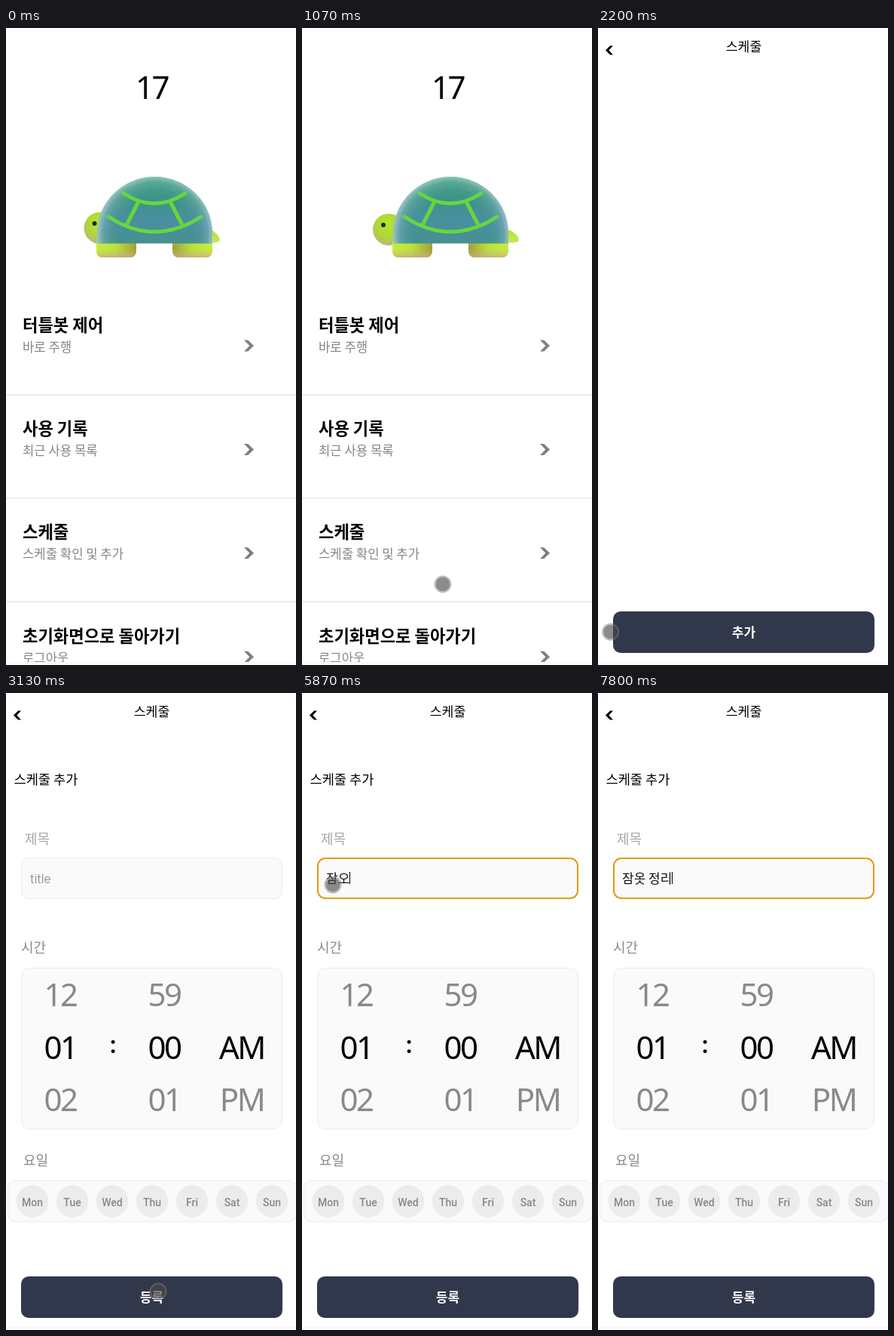
An HTML page with a canvas for the animation above (8 s loop, 385 px wide and 844 px high).

```html
<!DOCTYPE html>
<html lang="ko">
<head>
<meta charset="utf-8">
<title>스케줄</title>
<style>
  html, body { margin: 0; width: 100%; height: 100%; overflow: hidden; background: #fff; }
  canvas { display: block; width: 385px; height: 844px; }
</style>
</head>
<body>
<canvas id="stage" width="385" height="844"></canvas>
<script>
const ctx = document.getElementById('stage').getContext('2d');
const LOOP = 8000;
const HANGUL = '"Noto Sans CJK KR", "Noto Sans CJK JP", "Noto Sans CJK", sans-serif';
const LATIN = 'Roboto, sans-serif';
const NARROW = '"Noto Sans", sans-serif';
const GRAY = '#88898b';

const TIMES = { list: 1730, form: 3130, focus: 4400 };

// [time, x, y]
const POINTER = [
  [860, 49, 838], [930, 92, 800], [1070, 187, 737], [1270, 172, 719], [1600, 156, 706],
  [2030, 156, 706], [2130, 60, 760], [2200, 14, 800], [2270, 200, 812], [2330, 207, 793],
  [2410, 207, 793], [2470, 202, 793], [3420, 202, 793], [4000, 126, 262],
  [4610, 126, 262], [4730, 41, 254], [7230, 41, 254], [7530, 32, 254],
  [7670, 32, 254], [7730, 17, 388], [7790, 0, 430]
];

const TYPING = [
  [5200, 'ㅈ'], [5330, '자'], [5470, '잠'], [5730, '잠ㅇ'], [5870, '잠오'], [6000, '잠옷'],
  [6130, '잠옷 '], [6270, '잠옷 ㅈ'], [6330, '잠옷 저'], [6470, '잠옷 정'],
  [6600, '잠옷 정ㄹ'], [6730, '잠옷 정리']
];

const MENU = [
  ['터틀봇 제어', '바로 주행'],
  ['사용 기록', '최근 사용 목록'],
  ['스케줄', '스케줄 확인 및 추가'],
  ['초기화면으로 돌아가기', '로그아웃']
];

const mix = (a, b, p) => a + (b - a) * p;

function ease(t, from, to) {
  const p = Math.min(1, Math.max(0, (t - from) / (to - from)));
  return p * p * (3 - 2 * p);
}

function text(str, x, y, font, color = '#000', align = 'left', spacing = 0) {
  ctx.font = font;
  ctx.letterSpacing = spacing + 'px';
  ctx.textAlign = align;
  ctx.fillStyle = color;
  ctx.fillText(str, x, y);
}

const korean = (str, x, y, size, weight, color, align) =>
  text(str, x, y, `${weight} ${size}px ${HANGUL}`, color, align);

const numeral = (str, x, y, color) =>
  text(str, x - 1, y, `400 extra-condensed 42px ${NARROW}`, color, 'center', -2.5);

function box(x, y, w, h, fill, stroke, line = 1, radius = 10) {
  ctx.beginPath();
  ctx.roundRect(x, y, w, h, radius);
  ctx.fillStyle = fill;
  ctx.fill();
  if (stroke) {
    ctx.strokeStyle = stroke;
    ctx.lineWidth = line;
    ctx.stroke();
  }
}

function disc(x, y, r, fill) {
  ctx.beginPath();
  ctx.arc(x, y, r, 0, Math.PI * 2);
  ctx.fillStyle = fill;
  ctx.fill();
}

// dir 1 points right, -1 points left; x is the back edge
function chevron(x, y, w, h, dir, color) {
  const at = (px, py) => ctx.lineTo(x + dir * px * w, y + py * h);
  ctx.beginPath();
  at(0, -1); at(0.4, -1); at(1, 0); at(0.4, 1); at(0, 1); at(0.56, 0);
  ctx.fillStyle = color;
  ctx.fill();
}

function gradient(g, ...colors) {
  colors.forEach((c, i) => g.addColorStop(i / (colors.length - 1), c));
  return g;
}

function bottomStrip() {
  ctx.fillStyle = '#f9f9f9';
  ctx.fillRect(0, 840, 385, 4);
}

function leg(x, lift, limeX, oliveX) {
  const y = 282 - lift;
  const corners = [2, 2, 8, 8];
  box(x, y, 53, 22, gradient(ctx.createLinearGradient(limeX, 0, oliveX, 0),
    '#c6ee3c', '#bbe03c', '#a2a03a'), null, 0, corners);
  box(x, y, 53, 22, gradient(ctx.createLinearGradient(0, y + 10, 0, y + 22),
    'rgba(205,165,145,0)', 'rgba(205,165,145,.25)', 'rgba(205,165,145,.85)'), null, 0, corners);
}

function head(x, y) {
  disc(x, y, 21, gradient(ctx.createRadialGradient(x - 1, y - 7, 4, x, y - 4, 26),
    '#b4e32c', '#add838', '#c2b27c'));
  disc(x - 7, y - 6, 3, '#29271f');
}

function tail(reach) {
  ctx.beginPath();
  ctx.moveTo(268, 266);
  ctx.bezierCurveTo(280 + reach, 267, 287 + reach, 276, 288 + reach, 280);
  ctx.bezierCurveTo(288 + reach, 285, 279 + reach, 285, 268, 284);
  ctx.closePath();
  ctx.fillStyle = gradient(ctx.createLinearGradient(0, 268, 0, 285), '#b4e62c', '#c4e860');
  ctx.fill();
}

function shell(tuck) {
  ctx.save();
  ctx.translate(tuck, -1.5 * tuck);
  ctx.beginPath();
  ctx.moveTo(121, 285.5);
  ctx.lineTo(121, 272);
  ctx.ellipse(197.5, 272, 76.5, 75, 0, Math.PI, Math.PI * 2);
  ctx.lineTo(274, 285.5);
  ctx.closePath();
  ctx.fillStyle = gradient(ctx.createLinearGradient(0, 197, 0, 286),
    '#379a7d', '#3f9389', '#4a8fa0', '#44918f');
  ctx.fill();
  ctx.fillStyle = gradient(ctx.createRadialGradient(199, 275, 52, 198, 273, 78),
    'rgba(255,255,255,0)', 'rgba(255,255,255,.05)', 'rgba(255,255,255,.16)', 'rgba(255,255,255,.5)');
  ctx.fill();

  ctx.strokeStyle = '#66d640';
  ctx.lineWidth = 5;
  ctx.lineCap = 'round';
  ctx.beginPath();
  ctx.moveTo(156, 219);
  ctx.quadraticCurveTo(197, 246, 238, 219);
  ctx.moveTo(136, 250);
  ctx.quadraticCurveTo(197, 290, 259, 250);
  ctx.moveTo(175, 232);
  ctx.lineTo(160, 261);
  ctx.moveTo(219, 232);
  ctx.lineTo(234, 261);
  ctx.stroke();

  if (tuck > 0) {
    ctx.globalAlpha = tuck;
    ctx.beginPath();
    ctx.ellipse(197.5, 285, 74, 2, 0, 0, Math.PI * 2);
    ctx.fillStyle = '#a77df0';
    ctx.fill();
  }
  ctx.restore();
}

function turtle(t) {
  const stretch = ease(t, -200, 900);
  const start = ease(0, -200, 900);
  const out = (stretch - start) / (1 - start);
  const tuck = ease(t, 1130, 1600);
  tail(mix(-4, 0, out) - 22 * tuck);
  head(mix(124.5, 115, out) + 40 * tuck, mix(265, 267, out) - 8 * tuck);
  leg(120 + 20 * tuck, 24 * tuck, 120, 173);
  leg(221 - 20 * tuck, 24 * tuck, 274, 221);
  shell(tuck);
}

function homePage(t) {
  numeral('17', 194.5, 94, '#000');
  turtle(t);
  MENU.forEach(([title, note], i) => {
    const y = 137.4 * i;
    korean(title, 22, 401.5 + y, 22.2, 700, '#000');
    korean(note, 22, 428.5 + y, 16.7, 300, '#858585');
    chevron(316, 421 + y, 13, 7.5, 1, '#808083');
    ctx.fillStyle = '#ececec';
    if (i < 3) ctx.fillRect(0, Math.floor(485 + y), 385, 2);
  });
}

function chrome(label) {
  chevron(20, 29.5, 10, 6, -1, '#000');
  korean('스케줄', 193.5, 30.5, 17.2, 500, '#000', 'center');
  box(20, 773, 347, 55, '#32384b');
  korean(label, 193.5, 807, 17, 700, '#fff', 'center');
}

function titleField(t) {
  const focused = t >= TIMES.focus;
  if (focused) box(21, 219, 345, 53, '#fafafa', '#e69a0b', 2);
  else box(20.5, 218.5, 346, 54, '#fafafa', '#ececec');

  const [editedAt, value] = TYPING.filter(([at]) => t >= at).pop() || [TIMES.focus, ''];
  if (value) korean(value, 32, 251.5, 17, 300, '#111');
  else text('title', 32, 252, `300 17px ${LATIN}`, '#777');

  if (focused && (t - editedAt) % 1060 < 530) {
    const width = value ? ctx.measureText(value).width : 0;
    ctx.fillStyle = '#000';
    ctx.fillRect(Math.round(32 + width), 237, 1, 16);
  }
}

function timePicker() {
  korean('시간', 20, 343.5, 18, 400, GRAY);
  box(20.5, 364.5, 346, 213, '#fafafa', '#ececec');
  const columns = [[73, '12', '01', '02'], [211, '59', '00', '01'], [314, '', 'AM', 'PM']];
  for (const [x, ...values] of columns) {
    values.forEach((v, i) => numeral(v, x, 415 + 69.5 * i, i === 1 ? '#000' : GRAY));
  }
  text(':', 142, 477, `700 31px ${LATIN}`, '#000', 'center');
}

function dayPicker() {
  korean('요일', 23, 625.5, 18, 400, GRAY);
  box(2.5, 646.5, 383, 54, '#fafafa', '#ececec');
  ['Mon', 'Tue', 'Wed', 'Thu', 'Fri', 'Sat', 'Sun'].forEach((day, i) => {
    const x = 35 + 53 * i;
    disc(x, 673.5, 21.3, '#ececec');
    text(day, x, 680, `500 14px ${LATIN}`, GRAY, 'center');
  });
}

function formPage(t) {
  chrome('등록');
  korean('스케줄 추가', 10.5, 120.5, 17.6, 500, '#000');
  korean('제목', 25, 199.5, 18, 500, '#a3a8a6');
  titleField(t);
  timePicker();
  dayPicker();
}

function pointer(t) {
  const i = POINTER.findIndex(([at]) => at > t);
  if (i < 1) return;
  const [t0, x0, y0] = POINTER[i - 1];
  const [t1, x1, y1] = POINTER[i];
  const p = t1 - t0 > 300 ? ease(t, t0, t1) : (t - t0) / (t1 - t0);
  const x = mix(x0, x1, p), y = mix(y0, y1, p);
  disc(x, y, 11.5, 'rgba(128,128,128,.5)');
  disc(x, y, 9.3, 'rgba(0,0,0,.27)');
}

function draw(t) {
  ctx.fillStyle = '#fff';
  ctx.fillRect(0, 0, 385, 844);
  if (t < TIMES.list) homePage(t);
  else if (t < TIMES.form) chrome('추가');
  else formPage(t);
  bottomStrip();
  pointer(t);
}

const began = performance.now();
function tick() {
  draw((performance.now() - began) % LOOP);
  requestAnimationFrame(tick);
}
tick();
</script>
</body>
</html>
```
